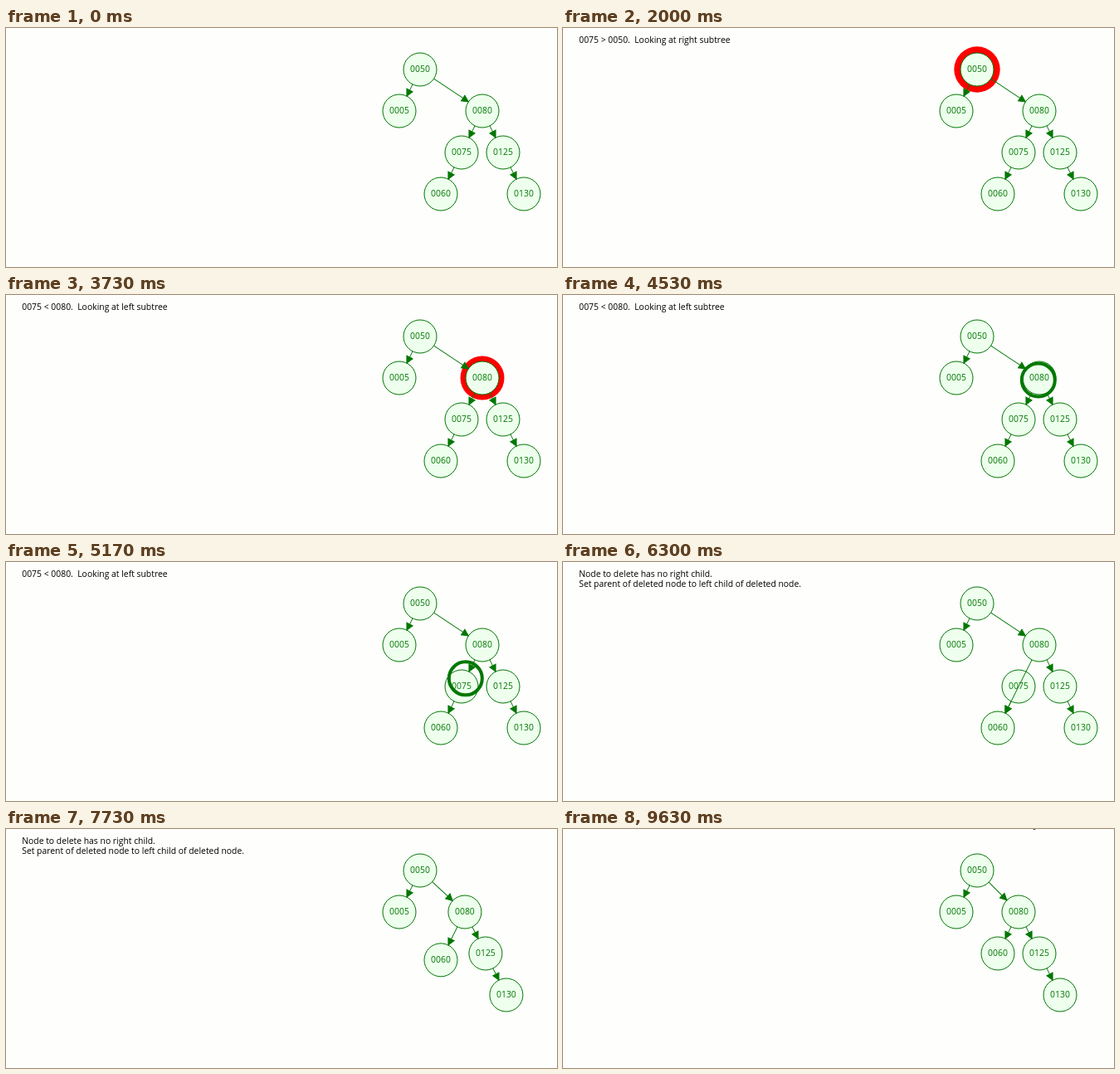
Animation, 664 px wide and 288 px high, one loop 9.66 s. Source, as an HTML page with a canvas:

```html
<!DOCTYPE html>
<html lang="en">
<head>
<meta charset="utf-8">
<title>Binary search tree: delete</title>
<style>
  html, body { margin: 0; width: 100%; height: 100%; overflow: hidden; background: #fefefd; }
  canvas { display: block; width: 664px; height: 288px; }
</style>
</head>
<body>
<canvas id="stage"></canvas>
<script>
const W = 664, H = 288, LOOP = 9660;
const BLOCK = 843;               // length of one step
const FIRST = 1970;              // first comparison
const RELINK = FIRST + 5 * BLOCK;
const RESIZE = 7030;
const RADIUS = 20;
const INK = '#007700', FILL = '#eeffee', PAPER = '#fefefd';

// key: [x, y, x after resize, y after resize]
const TREE = {
  '0050': [499, 50, 499, 50],
  '0005': [474, 100, 474, 100],
  '0080': [574, 100, 549, 100],
  '0075': [549, 150, 549, 150],
  '0125': [599, 150, 574, 150],
  '0060': [524, 200, 524, 150],
  '0130': [624, 200, 599, 200]
};

// from, to, shown from, shown until
const EDGES = [
  ['0050', '0005', 0, LOOP],
  ['0050', '0080', 0, LOOP],
  ['0080', '0125', 0, LOOP],
  ['0125', '0130', 0, LOOP],
  ['0080', '0075', 0, RELINK],
  ['0075', '0060', 0, RESIZE],
  ['0080', '0060', RELINK, LOOP]
];

const MESSAGES = [
  [0, ''],
  [1170, 'Deleting 0075'],
  [FIRST, '0075 > 0050.  Looking at right subtree'],
  [FIRST + 2 * BLOCK, '0075 < 0080.  Looking at left subtree'],
  [FIRST + 4 * BLOCK, '0075 == 0075.  Found node to delete'],
  [RELINK, 'Node to delete has no right child.\nSet parent of deleted node to left child of deleted node.'],
  [RESIZE + BLOCK + 30, '']
];

// what each block marks: a node, or a move between two nodes
const BLOCKS = [['0050'], ['0050', '0080'], ['0080'], ['0080', '0075'], ['0075']];

const canvas = document.getElementById('stage');
const ctx = canvas.getContext('2d');
const scale = window.devicePixelRatio || 1;
canvas.width = W * scale;
canvas.height = H * scale;

const clamp = v => Math.max(0, Math.min(1, v));
const mix = (a, b, k) => a + (b - a) * k;

function place(key, t) {
  const [x, y, x2, y2] = TREE[key];
  const k = clamp((t - RESIZE + 10) / BLOCK);
  return [mix(x, x2, k), mix(y, y2, k)];
}

function circle(x, y, r) {
  ctx.beginPath();
  ctx.arc(x, y, r, 0, 2 * Math.PI);
}

function drawNode(key, t, lit) {
  const [x, y] = place(key, t);
  if (lit) {
    const pulse = 3 + Math.abs((t / 210.7 + 0.8) % 10 - 5);
    ctx.fillStyle = '#ff0000';
    circle(x, y, RADIUS + pulse);
    ctx.fill();
  }
  ctx.fillStyle = FILL;
  ctx.strokeStyle = INK;
  ctx.lineWidth = 1;
  circle(x, y, RADIUS);
  ctx.fill();
  ctx.stroke();
  ctx.fillStyle = INK;
  ctx.textAlign = 'center';
  ctx.fillText(key, x, y + 3);
}

function drawEdge(from, to, t) {
  const [x1, y1] = place(from, t), [x2, y2] = place(to, t);
  const tip = Math.hypot(x2 - x1, y2 - y1) - RADIUS;
  ctx.save();
  ctx.translate(x1, y1);
  ctx.rotate(Math.atan2(y2 - y1, x2 - x1));
  ctx.strokeStyle = ctx.fillStyle = INK;
  ctx.lineWidth = 1;
  ctx.beginPath();
  ctx.moveTo(RADIUS, 0);
  ctx.lineTo(tip, 0);
  ctx.stroke();
  ctx.beginPath();
  ctx.moveTo(tip, 0);
  ctx.lineTo(tip - 8, -4);
  ctx.lineTo(tip - 8, 4);
  ctx.closePath();
  ctx.fill();
  ctx.stroke();
  ctx.restore();
}

function drawMarker([from, to], k) {
  const a = TREE[from], b = TREE[to];
  ctx.strokeStyle = INK;
  ctx.lineWidth = 4;
  circle(mix(a[0], b[0], k), mix(a[1], b[1], k), RADIUS);
  ctx.stroke();
}

function drawMessage(t) {
  const text = MESSAGES.filter(m => m[0] <= t).pop()[1];
  ctx.fillStyle = '#000';
  ctx.textAlign = 'left';
  text.split('\n').forEach((line, i) => ctx.fillText(line, 19.2, 18 + 12 * i));
}

// lower end of the mouse pointer passing along the top edge
function drawPointer(t) {
  const x = mix(542, 568, clamp((t - 9100) / 530));
  ctx.strokeStyle = '#222';
  ctx.lineWidth = 1;
  ctx.beginPath();
  ctx.moveTo(x - 2, -0.5);
  ctx.lineTo(x, 0.6);
  ctx.lineTo(x + 2, -0.5);
  ctx.stroke();
}

function draw(t) {
  ctx.setTransform(scale, 0, 0, scale, 0, 0);
  ctx.fillStyle = PAPER;
  ctx.fillRect(0, 0, W, H);
  ctx.font = '10.4px "Open Sans", "Noto Sans", sans-serif';

  const step = (t - FIRST) / BLOCK;
  const mark = BLOCKS[Math.floor(step)] || [];
  const moving = mark.length === 2;

  for (const key in TREE) {
    if (key === '0075' && t >= RESIZE) continue;
    drawNode(key, t, !moving && mark[0] === key);
  }
  for (const [from, to, begin, end] of EDGES) {
    if (t >= begin && t < end) drawEdge(from, to, t);
  }
  if (moving) drawMarker(mark, Math.min(1, step % 1 + 0.01));
  drawMessage(t);
  if (t >= 9100) drawPointer(t);
}

const start = performance.now();
function tick() {
  draw((performance.now() - start) % LOOP);
  requestAnimationFrame(tick);
}
tick();
</script>
</body>
</html>
```
